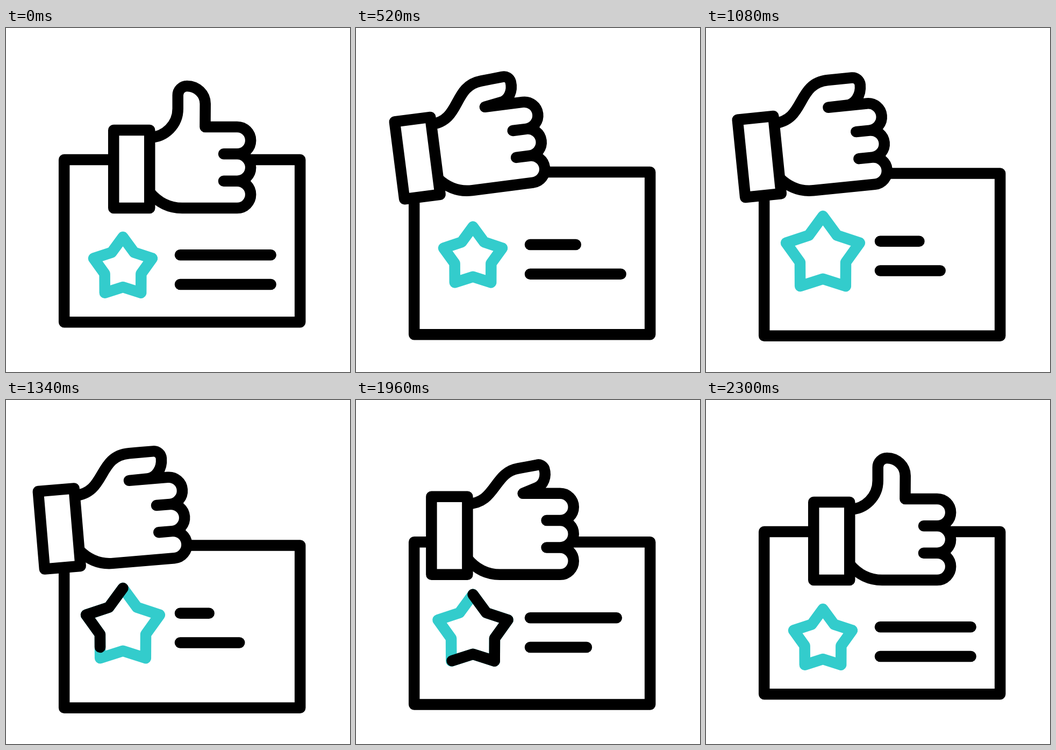
Write an HTML page with a canvas that moves like this. It is 640x640 px and loops after 2.4 s.

```html
<!DOCTYPE html>
<html lang="en">
<head>
<meta charset="utf-8">
<title>Thumbs-up card</title>
<style>
  html, body { margin: 0; width: 100%; height: 100%; overflow: hidden; background: #fff; }
  canvas { display: block; width: 640px; height: 640px; }
</style>
</head>
<body>
<canvas id="stage" width="640" height="640"></canvas>
<script>
const ctx = document.getElementById('stage').getContext('2d');
const LOOP = 2400, BLACK = '#000', TEAL = '#33cccc';

// Thumb key points around the cuff centre: x, y, heading (1 level, 0 upright).
const OPEN = [[33.5, -59, 1], [86, -112.5, 0], [86, -137.5, 0], [103, -154.5, 1], [137, -121.5, 0]];
const CLOSED = [[33.5, -59, 1], [141, -129, 1], [186, -129, 1], [200, -114.5, 0], [171, -79, 1]];

const mix = (a, b, k) => a + (b - a) * k;
const ease = u => u * u * (3 - 2 * u);
const ramp = (t, from, to) => ease(Math.min(1, Math.max(0, (t - from) / (to - from))));

function polyline(points, color) {
  ctx.beginPath();
  points.forEach(p => ctx.lineTo(...p));
  ctx.strokeStyle = color;
  ctx.stroke();
}

function box(x, y, w, h) {
  ctx.fillRect(x, y, w, h);
  ctx.strokeRect(x, y, w, h);
}

function drawStar(t, lift) {
  const size = 1 + 0.257 * (ramp(t, 600, 1000) - ramp(t, 1800, 2300));
  const cy = 441.5 + 4.8 * size - lift;
  const points = Array.from({ length: 11 }, (_, i) => {
    const a = -Math.PI / 5 * i, r = size * (i % 2 ? 35.6 : 57.3);
    return [217.5 + r * Math.sin(a), cy - r * Math.cos(a)];
  });
  polyline(points, TEAL);

  // The black outline runs once around, then its tail follows.
  const [[x0, y0], [x1, y1]] = points;
  const around = 10 * Math.hypot(x1 - x0, y1 - y0);
  const head = ramp(t, 1100, 1700), tail = ramp(t, 1700, 2300);
  if (head > tail) {
    ctx.setLineDash([(head - tail) * around, 2 * around]);
    ctx.lineDashOffset = -tail * around;
    polyline(points, BLACK);
    ctx.setLineDash([]);
  }
}

function drawLines(t, lift) {
  const first = 1 - 0.6 * ramp(t, 300, 600) + 0.33 * ramp(t, 600, 900)
    - 0.46 * ramp(t, 900, 1200) + 0.73 * ramp(t, 1200, 2100);
  const second = 1 - 0.39 * ramp(t, 600, 900) + 0.08 * ramp(t, 900, 1200)
    - 0.08 * ramp(t, 1200, 1500) - 0.11 * ramp(t, 1500, 1800) + 0.5 * ramp(t, 1800, 2300);
  [first, second].forEach((part, i) => {
    const y = 422.2 + 54.7 * i - lift;
    polyline([[324, y], [324 + 168.7 * part, y]], BLACK);
  });
}

// Curve points of a pose: each stretch leaves and arrives along its headings.
function outline(pose) {
  const handle = ([x, y, level], [qx, qy]) =>
    [mix(x, qx, 0.55 * level), mix(y, qy, 0.55 * (1 - level))];
  return pose.slice(1).flatMap((q, i) => [handle(pose[i], q), handle(q, pose[i]), q]);
}

function drawHand(t, fold) {
  const shift = ramp(t, 200, 605) - ramp(t, 1800, 2100);
  const beat = Math.min(4, Math.max(0, t / 300 - 1)) % 2;
  const tilt = 8.8 * ease(1 - Math.abs(1 - beat));
  ctx.save();
  ctx.translate(233.75 - 134.5 * shift, 262.5 - 23 * shift);
  ctx.rotate(-tilt * Math.PI / 180);

  const closed = outline(CLOSED);
  const thumb = outline(OPEN).map((p, i) => [0, 1].map(j => mix(p[j], closed[i][j], fold)));
  ctx.beginPath();
  ctx.moveTo(33.5, -59);
  for (let i = 0; i < thumb.length; i += 3) {
    ctx.bezierCurveTo(...thumb[i], ...thumb[i + 1], ...thumb[i + 2]);
  }
  ctx.lineTo(136.75, -78.5);

  const x = 196.25 + 12.5 * fold, r = 25.17;
  for (let i = 0; i < 3; i++) {
    const y = -78.5 + 2 * r * i;
    if (i) ctx.lineTo(x - 25, y);
    ctx.lineTo(x, y);
    ctx.arc(x, y + r, r, -Math.PI / 2, Math.PI / 2);
  }
  ctx.lineTo(94, 72.5);
  ctx.quadraticCurveTo(58, 72.5, 33.5, 43);
  ctx.fill();
  ctx.stroke();
  box(-33.5, -72.5, 67, 145);
  ctx.restore();
}

function draw(t) {
  const fold = ramp(t, 200, 600) - ramp(t, 1800, 2300);
  const lift = 25.5 * (ramp(t, 200, 675) - ramp(t, 1800, 2215));
  ctx.fillStyle = '#fff';
  ctx.fillRect(0, 0, 640, 640);
  ctx.lineWidth = 20.5;
  ctx.lineCap = ctx.lineJoin = 'round';
  ctx.strokeStyle = BLACK;
  box(108.2, 245 + 25.5 * fold, 439, 302.3);
  drawStar(t, lift);
  drawLines(t, lift);
  drawHand(t, fold);
}

const start = performance.now();
function tick() {
  draw((performance.now() - start) % LOOP);
  requestAnimationFrame(tick);
}
tick();
</script>
</body>
</html>
```
